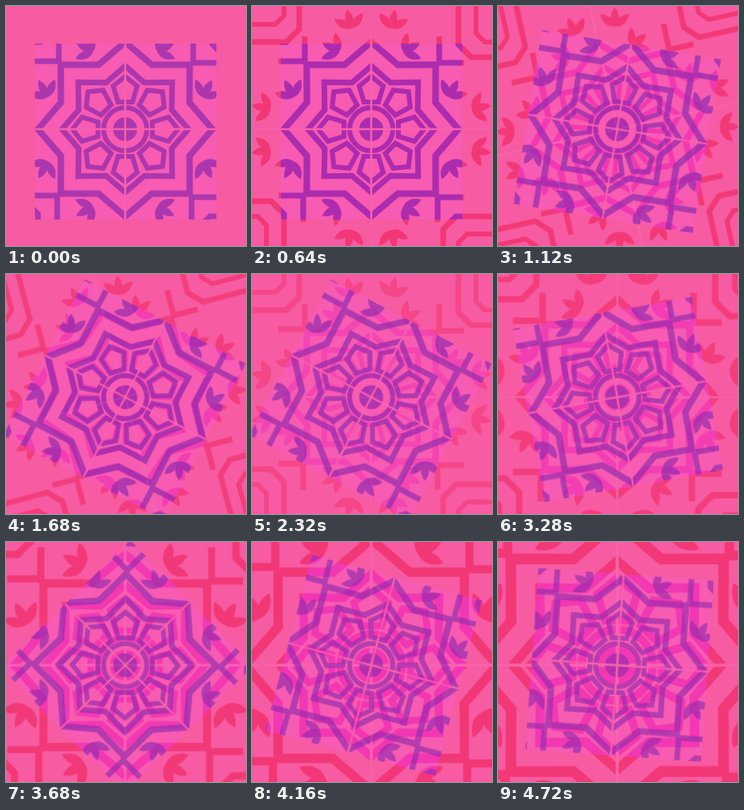
Animation, 300 px wide and 300 px high, one loop 4800 ms. Source, as an HTML page:

```html
<!DOCTYPE html>
<html lang="en">
<head>
<meta charset="utf-8">
<title>Turning tiles</title>
<style>
html, body { margin: 0; width: 100%; height: 100%; overflow: hidden; background: #f75ba1; }
svg { display: block; width: 100vw; height: 100vh; }
#wash { mix-blend-mode: lighten; }
</style>
</head>
<body>
<svg viewBox="0 0 300 300">
  <defs>
    <clipPath id="crop"><rect x="-113" y="-107" width="227" height="220"/></clipPath>
    <g id="pattern" fill="none" stroke="currentColor"></g>
  </defs>
  <rect width="300" height="300" fill="#f75ba1"/>
  <g id="back" color="#f02c68"><use href="#pattern"/></g>
  <rect id="wash" x="-113" y="-107" width="227" height="220" fill="#0000b2"/>
  <g id="front" color="#8c28ac"><g clip-path="url(#crop)"><use href="#pattern"/></g></g>
</svg>
<script>
const LOOP = 4800, STEP = 80, CX = 149, CY = 154;
const $ = id => document.getElementById(id);

const line = (d, w) => `<path d="${d}" stroke-width="${w}"/>`;
const solid = d => `<path d="${d}" fill="currentColor" stroke="none"/>`;
const turned = (body, deg) => `<g transform="rotate(${deg})">${body}</g>`;

// Star whose points alternate between straight and diagonal ones
function star(tip, diagonal, notch) {
  const radii = [tip, notch, diagonal, notch];
  const pts = [];
  for (let i = 0; i < 16; i++) {
    const a = i * Math.PI / 8, r = radii[i % 4];
    pts.push((r * Math.sin(a)).toFixed(1) + ' ' + (-r * Math.cos(a)).toFixed(1));
  }
  return 'M' + pts.join('L') + 'Z';
}

// Pointed leaf from a base, with a length, width and heading
function leaf(x, y, len, wide, deg) {
  const body = solid(`M0 0C${wide} ${-len * .3} ${wide * .8} ${-len * .7} 0 ${-len}` +
    `C${-wide * .8} ${-len * .7} ${-wide} ${-len * .3} 0 0Z`);
  return `<g transform="translate(${x} ${y}) rotate(${deg})">${body}</g>`;
}

function tulip(x, y, size, deg) {
  return [-50, 0, 50].map(d => leaf(x, y, size, size * .3, deg + d)).join('');
}

function build() {
  const sprig = tulip(-40, -97, 24, -62) + tulip(-25, -126, 24, -12);
  const corner = sprig + `<g transform="matrix(0 1 1 0 0 0)">${sprig}</g>` +
    line('M-116 -85H-83V-116', 7) +
    line('M-240 -109H-106L-90 -125V-240', 7) +
    line('M-240 -131H-120L-109 -142V-240', 6);
  const petal = line('M0 -66L15 -54L9 -34H-9L-15 -54Z', 6);

  let out = line(star(109, 114, 87), 8) + line(star(79, 83, 63), 7);
  for (let k = 0; k < 8; k++) out += turned(petal, k * 45);
  for (let k = 0; k < 4; k++) out += turned(corner, k * 90);
  out += '<circle r="27" stroke-width="6"/><circle r="15" fill="currentColor" stroke="none"/>';
  out += '<path d="M0 -240V240M-240 0H240" stroke="#f864ab" stroke-width="2.5"/>';
  $('pattern').innerHTML = out;
}

// Progress through a span, 0 to 1
const span = (t, from, to) => Math.min(1, Math.max(0, (t - from) / (to - from)));

// Slow at both ends
const ease = u => u * u / (u * u + (1 - u) * (1 - u));

function place(id, turn, size = 1) {
  $(id).setAttribute('transform', `translate(${CX} ${CY}) rotate(${turn}) scale(${size})`);
}

function draw(t) {
  // The tile winds up to the right, then sweeps back to the left
  const turn = 28 * ease(span(t, 640, 1800)) - 114 * ease(span(t, 2200, 4800));
  const sway = -16 * Math.sin(Math.PI * span(t, 640, 2320));
  const size = 1 + .65 * span(t, 2940, 4720);
  const dip = Math.exp(-(((t - 2500) / 800) ** 2));

  place('back', sway, size);
  place('wash', turn);
  place('front', turn);
  $('back').setAttribute('opacity', span(t, 0, 480) * (.75 - .33 * dip));
  $('front').setAttribute('opacity', .7 - .1 * t / LOOP);
}

build();
draw(0);
const start = performance.now();
function tick(now) {
  const t = Math.max(0, now - start) % LOOP;
  draw(Math.floor(t / STEP) * STEP);
  requestAnimationFrame(tick);
}
requestAnimationFrame(tick);
</script>
</body>
</html>
```
